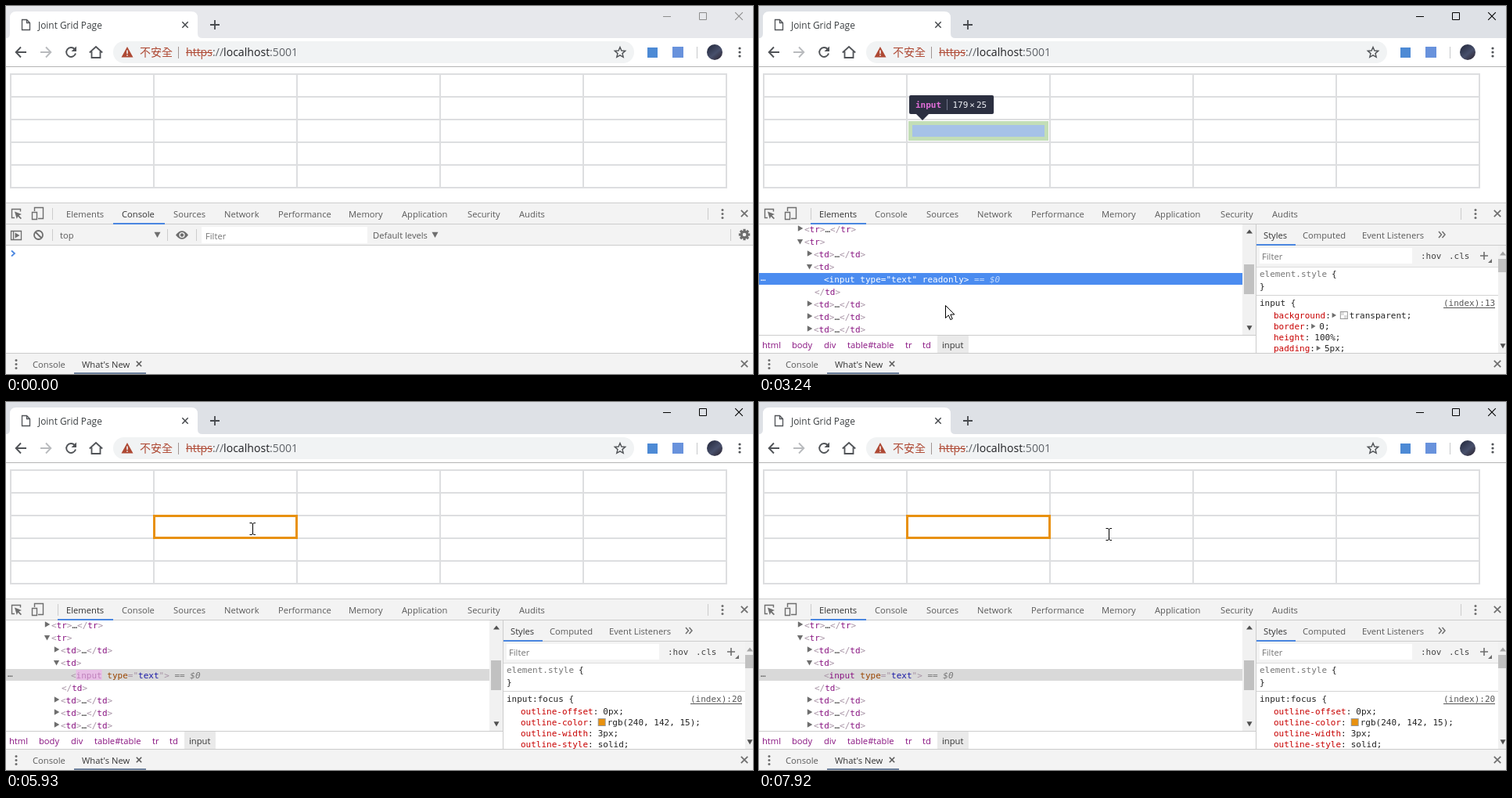
Recreate the animation shown at these times as an HTML page with a canvas. Size 955 by 470 pixels, loop 8000 ms.

```html
<!DOCTYPE html>
<html lang="en">
<head>
<meta charset="utf-8">
<title>Joint Grid Page</title>
<style>
html, body { margin: 0; width: 100%; height: 100%; overflow: hidden; background: #fff; }
canvas { display: block; }
</style>
</head>
<body>
<canvas id="stage" width="955" height="470"></canvas>
<script>
const ctx = document.getElementById('stage').getContext('2d');
const LOOP = 8000;
const UI = '11.2px "Open Sans", "Noto Sans", sans-serif';
const TITLE = '11.9px "Open Sans", "Noto Sans", sans-serif';
const URL_FONT = '14.1px "Open Sans", "Noto Sans", sans-serif';
const CJK = '14px "Noto Sans CJK TC", "Noto Sans CJK", sans-serif';
const MONO = '11px "DejaVu Sans Mono", "Noto Sans Mono", monospace';
const GREY = '#5a5a5a', ICON = '#6e6e6e', BAR = '#f3f3f3', EDGE = '#cccccc', BLUE = '#4a86e0';
const TAG = '#881280', BRACKET = '#a894a6', ATTR = '#994500', VALUE = '#1a1aa6';
const CELL_W = 183, CELL_H = 29, LEFT = 6, TOP = 87;

// --- drawing helpers ---
function box(x, y, w, h, fill) {
  ctx.fillStyle = fill;
  ctx.fillRect(x, y, w, h);
}
function text(s, x, y, color = GREY, font = UI) {
  ctx.font = font;
  ctx.fillStyle = color;
  ctx.fillText(s, x, y);
  return x + ctx.measureText(s).width;
}
function runs(parts, x, y, font = MONO) {
  for (const [s, color] of parts) x = text(s, x, y, color, font);
  return x;
}
function disc(x, y, r, fill) {
  ctx.fillStyle = fill;
  ctx.beginPath();
  ctx.arc(x, y, r, 0, 7);
  ctx.fill();
}
function shape(d, { x = 0, y = 0, fill, stroke, width = 1 }) {
  const p = new Path2D(d);
  ctx.save();
  ctx.translate(x, y);
  if (fill) { ctx.fillStyle = fill; ctx.fill(p, 'evenodd'); }
  if (stroke) { ctx.strokeStyle = stroke; ctx.lineWidth = width; ctx.stroke(p); }
  ctx.restore();
}
function rounded(x, y, w, h, r, fill) {
  ctx.fillStyle = fill;
  ctx.beginPath();
  ctx.roundRect(x, y, w, h, r);
  ctx.fill();
}
function cross(x, y, r, stroke, width) {
  shape(`M${-r} ${-r}L${r} ${r}M${r} ${-r}L${-r} ${r}`, { x, y, stroke, width });
}
function dots(x, y, gap, color, r = 1.5) {
  for (const k of [-1, 0, 1]) disc(x, y + k * gap, r, color);
}
function down(x, y, r, fill = ICON) { shape(`M${-r} ${-r * .8}H${r}L0 ${r}Z`, { x, y, fill }); }
function up(x, y, r, fill = '#505050') { shape(`M${-r} ${r * .6}H${r}L0 ${-r * .6}Z`, { x, y, fill }); }
function right(x, y, r, fill = ICON) { shape(`M${-r * .7} ${-r}V${r}L${r} 0Z`, { x, y, fill }); }
function mix(a, b, k) {
  return `rgb(${a.map((v, i) => Math.round(v + (b[i] - v) * k)).join()})`;
}

// --- pointer ---
const PATH = [
  [780, 521, 439], [1480, 17, 266], [1740, 17, 266], [2210, 247, 160], [2950, 247, 160],
  [3320, 235, 411], [3700, 228, 309], [3760, 228, 311], [3960, 240, 411], [4490, 323, 150],
  [4795, 323, 150], [4850, 315, 161], [5900, 315, 161], [5930, 315, 162], [6190, 228, 410],
  [6430, 213, 306], [6720, 215, 361], [6900, 232, 411], [7180, 230, 366], [7340, 230, 366],
  [7920, 447, 169], [8000, 447, 169]
];
function slope(i, axis) {
  if (i < 1 || i >= PATH.length - 1) return 0;
  const d = j => (PATH[j + 1][axis] - PATH[j][axis]) / (PATH[j + 1][0] - PATH[j][0]);
  const a = d(i - 1), b = d(i);
  return a * b <= 0 ? 0 : 2 * a * b / (a + b);
}
function pointer(t) {
  if (t < PATH[0][0]) return null;
  let i = 0;
  while (i < PATH.length - 2 && t >= PATH[i + 1][0]) i++;
  const span = PATH[i + 1][0] - PATH[i][0], u = (t - PATH[i][0]) / span;
  return [1, 2].map(axis => {
    const a = PATH[i][axis], b = PATH[i + 1][axis];
    return a + (b - a) * u * u * (3 - 2 * u)
      + span * u * (1 - u) * (slope(i, axis) * (1 - u) - slope(i + 1, axis) * u);
  });
}
function cellAt([x, y]) {
  const col = Math.floor((x - LEFT) / CELL_W), row = Math.floor((y - TOP) / CELL_H);
  return col >= 0 && col < 5 && row >= 0 && row < 5 ? { row, col } : null;
}
function drawPointer(t, inspecting) {
  const at = pointer(t);
  if (!at) return;
  const [x, y] = at.map(Math.round);
  const pressed = [[1650, 1740], [2440, 2540], [5080, 5150], [5250, 5320]].some(([a, b]) => t >= a && t < b);
  if (pressed) disc(x, y, 12.5, 'rgba(255,255,0,.5)');
  if (cellAt(at) && !inspecting) {
    shape('M-3.5 -7.5H-1L.5 -6.5L2 -7.5H4M.5 -6.5V6.5M-3.5 7.5H-1L.5 6.5L2 7.5H4', { x, y, stroke: '#000' });
  } else {
    shape('M.5 .5V16.5L4.3 12.9L6.8 18.6L9.3 17.5L6.8 12H11.9Z', { x, y, fill: '#fff', stroke: '#000' });
  }
}

// --- browser frame ---
function drawBrowser(active) {
  box(0, 0, 955, 41, active ? '#dee1e6' : '#e7e8ec');
  shape('M0 41Q5 41 5 35V15Q5 7 13 7H237Q245 7 245 15V35Q245 41 251 41Z', { fill: '#fff' });
  shape('M20.5 17.5H26.5L30.5 21.5V30.5H20.5ZM26.5 17.5V21.5H30.5', { stroke: '#505357', width: 1.3 });
  text('Joint Grid Page', 41, 29, '#3c4043', TITLE);
  cross(229, 24, 3.7, '#46494d', 1.5);
  shape('M261 24H273M267 18V30', { stroke: '#46494d', width: 1.8 });
  const ctl = active ? '#000' : '#8c8c8c';
  shape('M840 13.5H850M886.5 8.5H895.5V17.5H886.5Z', { stroke: ctl });
  cross(937, 13, 4.8, ctl, 1.1);

  box(0, 41, 955, 36, '#fff');
  box(0, 77, 955, 1, '#b4b4b4');
  const dark = '#505357';
  shape('M26 59H13M19 52.5L12.7 59L19 65.5', { stroke: dark, width: 1.9 });
  shape('M44 59H57M51 52.5L57.3 59L51 65.5', { stroke: '#b9bbbe', width: 1.9 });
  shape('M87.7 55A6 6 0 1 0 89 60.5', { stroke: dark, width: 1.9 });
  shape('M90 51.5V58H83.5Z', { fill: dark });
  shape('M106.8 59.5L115 52L123.2 59.5M109.5 58V66H120.5V58', { stroke: dark, width: 1.8 });
  rounded(137, 45, 666, 28, 14, '#f1f3f4');
  const warn = '#ae4934';
  shape('M155 52L162.5 65.5H147.5ZM154.2 56.5V61H155.8V56.5ZM154.2 62.2V63.8H155.8V62.2Z', { fill: warn });
  text('不安全', 171, 64, warn, CJK);
  box(220, 52, 1, 15, '#a09693');
  const end = text('https', 230, 64, warn, URL_FONT);
  box(230, 59, end - 230, 1, warn);
  runs([['://', '#5f6368'], ['localhost', '#202124'], [':5001', '#5f6368']], end, 64, URL_FONT);
  shape('M785 52.5L786.9 57L791.7 57.4L788 60.6L789.2 65.3L785 62.8L780.8 65.3L782 60.6L778.3 57.4L783.1 57Z',
    { stroke: dark, width: 1.4 });
  box(820, 53, 13, 13, '#4d8ad5');
  box(852, 52, 14, 14, '#6892dc');
  box(883, 52, 1, 15, '#c6c8cb');
  const tone = ctx.createLinearGradient(898, 50, 914, 69);
  tone.addColorStop(0, '#252a3e');
  tone.addColorStop(.55, '#48506c');
  tone.addColorStop(1, '#2c2430');
  disc(906, 59, 10, tone);
  dots(938, 59, 5, dark, 1.6);
}
function drawTable() {
  for (let i = 0; i < 6; i++) {
    box(LEFT - 1 + i * CELL_W, TOP - 1, 2, 147, '#dddee0');
    box(LEFT - 1, TOP - 1 + i * CELL_H, 917, 2, '#dddee0');
  }
}

// --- devtools ---
function drawTabs(elements, inspectColor) {
  box(0, 251, 955, 28, BAR);
  box(0, 251, 955, 1, EDGE);
  box(0, 278, 955, 1, EDGE);
  shape('M11 270.5H7.5V259.5H18.5V262.5', { stroke: inspectColor, width: 1.4 });
  shape('M11 262.5L20 266L16.5 267.5L20 271L18.8 272.2L15.2 268.7L13.8 272Z', { fill: inspectColor });
  shape('M36.5 262V257.5H47.5V271.5H41M33.5 263.5H39.5V272.5H33.5Z', { stroke: ICON, width: 1.4 });
  box(elements ? 66 : 59, 258, 1, 15, EDGE);
  const names = ['Elements', 'Console', 'Sources', 'Network', 'Performance', 'Memory', 'Application', 'Security', 'Audits'];
  const xs = [77, 148, 214, 279, 348, 438, 506, 590, 656];
  names.forEach((s, i) => text(s, xs[i], 270, i === (elements ? 0 : 1) ? '#333' : GREY));
  box(elements ? 66 : 137, 277, elements ? 71 : 66, 2, BLUE);
  box(897, 258, 1, 15, EDGE);
  dots(916, 265.5, 5, ICON);
  cross(944, 265, 4.2, ICON, 1.7);
}
function drawDrawer() {
  box(0, 443, 955, 27, BAR);
  box(0, 443, 955, 1, EDGE);
  dots(13, 457.5, 5, ICON);
  text('Console', 34, 462);
  text("What's New", 97, 462, '#333');
  cross(170, 457, 3.2, GREY, 1.6);
  box(87, 468, 92, 2, '#70839f');
  cross(944, 457, 4.2, ICON, 1.7);
}
function drawConsole() {
  box(0, 279, 955, 26, BAR);
  box(0, 305, 955, 1, EDGE);
  shape('M6.5 287.5H19.5V298.5H6.5ZM9.5 287.5V298.5', { stroke: ICON, width: 1.3 });
  right(14, 293, 3.5);
  shape('M47 292.5A5.5 5.5 0 1 1 36 292.5A5.5 5.5 0 1 1 47 292.5M37.5 288.5L45.5 296.5', { stroke: ICON, width: 1.8 });
  for (const x of [59, 206, 243, 926]) box(x, 285, 1, 15, EDGE);
  text('top', 69, 297);
  down(193.5, 292, 4);
  shape('M217 292.5Q225 282 233 292.5Q225 303 217 292.5Z', { fill: ICON });
  disc(225, 292.5, 3.6, BAR);
  disc(225, 292.5, 2.2, ICON);
  box(250, 282, 212, 21, '#fff');
  text('Filter', 255, 298, '#757575');
  text('Default levels', 469, 297);
  down(548.5, 292, 4);
  for (let i = 0; i < 8; i++) {
    ctx.save();
    ctx.translate(944, 292);
    ctx.rotate(i * Math.PI / 4);
    box(-1.6, -7.2, 3.2, 4, ICON);
    ctx.restore();
  }
  disc(944, 292, 5.3, ICON);
  disc(944, 292, 2.3, BAR);
  box(0, 306, 955, 137, '#fff');
  shape('M7 312.5L11 316L7 319.5', { stroke: BLUE, width: 1.7 });
}

const tag = (name, close) => [[close ? '</' : '<', BRACKET], [name, TAG], ['>', BRACKET]];
const folded = name => [...tag(name), ['…', '#333'], ...tag(name, true)];
// kind, outlined table part, for each visible tree line
const TREE = [
  ['tr', { el: 'tr', row: 1 }], ['tr open', { el: 'tr', row: 2 }],
  ['td', { el: 'td', row: 2, col: 0 }], ['td open', { el: 'td', row: 2, col: 1 }],
  ['input', { el: 'input', row: 2, col: 1 }], ['td close', { el: 'td', row: 2, col: 1 }],
  ['td', { el: 'td', row: 2, col: 2 }], ['td', { el: 'td', row: 2, col: 3 }], ['td', { el: 'td', row: 2, col: 4 }]
];
function lineAt(at) {
  if (!at || at[0] > 618 || at[1] < 279 || at[1] >= 420) return -1;
  return Math.floor((at[1] - 277) / 16);
}
function drawInputLine(t, y) {
  const focused = t < 5080, readonly = t < 5330;
  box(0, y - 8, 618, 15, focused ? '#4b8cf0' : '#d9d9d9');
  const c = color => focused ? '#fff' : color;
  text('…', 2, y + 2, c('#5a5a5a'), MONO);
  let x = text('<', 83, y + 4, c(BRACKET), MONO);
  let name = c(TAG);
  const age = t - 5330;
  if (age >= 0 && age < 1400) {
    const k = 1 - (1 - Math.min(1, age / 1120)) ** 3;
    ctx.globalAlpha = Math.min(1, (1400 - age) / 280);
    box(x, y - 7, 33, 13, mix([158, 54, 153], [240, 205, 238], k));
    ctx.globalAlpha = 1;
    name = mix([255, 255, 255], [136, 18, 128], Math.min(1, age / 1120));
  }
  const parts = [['input', name], [' type', c(ATTR)], ['="', c(BRACKET)], ['text', c(VALUE)], ['"', c(BRACKET)]];
  if (readonly) parts.push([' readonly', c(ATTR)]);
  parts.push(['>', c(BRACKET)]);
  x = runs(parts, x, y + 4);
  text(' == $0', x, y + 4, focused ? '#c2d9fb' : '#777', 'italic ' + MONO);
}
function drawTree(t, hover) {
  box(0, 279, 635, 164, '#fff');
  ctx.save();
  ctx.beginPath();
  ctx.rect(0, 279, 618, 141);
  ctx.clip();
  TREE.forEach(([kind], i) => {
    const y = 285 + i * 16, [name, state] = kind.split(' ');
    if (name === 'input') return drawInputLine(t, y);
    if (i === hover) rounded(0, y - 8, 616, 16, [0, 5, 5, 0], '#edf1fb');
    const x = name === 'tr' ? 58 : 70;
    if (state === 'open') down(x - 5.5, y, 3.6);
    else if (!state) right(x - 5.5, y - 1, 3.8);
    runs(state ? tag(name, state === 'close') : folded(name), state === 'close' ? 71 : x, y + 4);
  });
  ctx.restore();

  box(618, 279, 17, 141, '#f1f1f1');
  box(620, 330, 13, 38, '#c1c1c1');
  up(627, 288, 4);
  down(627, 411, 3.5, '#505050');
  box(0, 420, 635, 1, EDGE);
  box(228, 421, 40, 22, '#eaeaea');
  const crumbs = { html: 4, body: 42, div: 83, 'table#table': 113, tr: 187, td: 209, input: 234 };
  for (const s in crumbs) text(s, crumbs[s], 437, s === 'input' ? '#333' : TAG);
}
function drawStyles(focusRule) {
  box(635, 279, 320, 164, '#fff');
  box(636, 279, 319, 54, BAR);
  box(635, 279, 1, 164, EDGE);
  box(636, 305, 319, 1, EDGE);
  box(636, 333, 309, 1, '#dddddd');
  text('Styles', 645, 297, '#333');
  text('Computed', 695, 297);
  text('Event Listeners', 771, 297);
  shape('M869 288L872.5 292L869 296M873.5 288L877 292L873.5 296', { stroke: ICON, width: 1.5 });
  box(636, 304, 50, 2, BLUE);
  box(640, 309, 195, 20, '#fff');
  text('Filter', 643, 324, '#757575');
  text(':hov', 846, 323, '#444', MONO);
  text('.cls', 882, 323, '#444', MONO);
  shape('M922 319H932M927 314V324', { stroke: ICON, width: 1.6 });
  shape('M937 323V328H932Z', { fill: ICON });

  text('element.style', 640, 346, '#777', MONO);
  text('{', 732, 346, '#222', MONO);
  text('}', 640, 362, '#222', MONO);
  box(636, 369, 309, 1, '#d4d4d4');
  text(focusRule ? 'input:focus {' : 'input {', 640, 383, '#222', MONO);
  const link = '(index):' + (focusRule ? 20 : 13);
  text(link, 875, 383, '#555', MONO);
  box(875, 385, 66, 1, '#555');
  const rules = focusRule
    ? [['outline-offset', '0px'], ['outline-color', 'rgb(240, 142, 15)', '#e8910f'], ['outline-width', '3px'], ['outline-style', 'solid']]
    : [['background', 'transparent', '#fff', 1], ['border', '0', 0, 1], ['height', '100%'], ['padding', '5px', 0, 1]];
  rules.forEach(([name, value, swatch, arrow], i) => {
    const y = 399 + i * 14;
    let x = runs([[name, '#c80000'], [':', '#222']], 658, y);
    if (arrow) { right(x + 4, y - 4, 3.2); x += 6; }
    x += 6;
    if (swatch) {
      box(x, y - 9, 10, 10, '#999');
      box(x + 1, y - 8, 8, 8, swatch);
      if (arrow) { box(x + 1, y - 8, 4, 4, '#ddd'); box(x + 5, y - 4, 4, 4, '#ddd'); }
      x += 12;
    }
    text(value + ';', x, y, '#222', MONO);
  });
  box(945, 306, 10, 137, '#f1f1f1');
  box(945, 323, 10, 17, '#c1c1c1');
  up(951, 316, 4, '#a3a3a3');
  down(951, 434, 3.5, '#505050');
}

// --- element outline and its size label ---
function drawOverlay({ el, row, col = 0 }) {
  let x = LEFT + col * CELL_W, y = TOP + row * CELL_H + (el === 'input' ? 2 : 0), w = CELL_W, h = CELL_H;
  const content = 'rgba(128,168,222,.7)', padding = 'rgba(147,196,125,.55)', border = 'rgba(255,229,153,.66)';
  const ring = (m, fill) => {
    shape(`M0 0H${w}V${h}H0ZM${m} ${m}H${w - m}V${h - m}H${m}Z`, { x, y, fill });
    x += m; y += m; w -= 2 * m; h -= 2 * m;
  };
  if (el === 'tr') w = CELL_W * 5;
  if (el === 'input') { x += 2; w -= 4; h -= 4; }
  const size = [w, h], tipX = x + 1, tipY = y - 33;
  if (el === 'td') { ring(1, border); ring(1, padding); }
  if (el === 'input') ring(5, padding);
  box(x, y, w, h, content);

  const ink = '#2b2f40', bold = 'bold ' + MONO, nameW = el.length * 6.62;
  rounded(tipX, tipY, nameW + 75, 24, 2, ink);
  shape('M9 24H25L17 32Z', { x: tipX, y: tipY, fill: ink });
  text(el, tipX + 8, tipY + 16, '#e36eda', bold);
  const sep = Math.round(tipX + nameW + 15);
  box(sep, tipY + 5, 1, 14, '#70748a');
  let tx = text(size[0], sep + 7.5, tipY + 16, '#eef0f5', MONO);
  tx = text('×', tx + 2, tipY + 16, '#eef0f5', MONO);
  text(size[1], tx + 2, tipY + 16, '#eef0f5', MONO);
}

function draw(t) {
  const elements = t >= 2590, inspecting = t >= 1740 && t < 2540;
  const seen = pointer(t - 40);
  const hover = elements ? lineAt(seen) : -1;
  let target = hover >= 0 ? TREE[hover][1] : null;
  if (inspecting && t < 2440) {
    const cell = cellAt(seen);
    if (cell) target = { el: 'input', ...cell };
  }
  box(0, 0, 955, 470, '#fff');
  drawBrowser(t >= 1650);
  drawTable();
  if (t >= 5250 && Math.floor((t - 5250) / 530) % 2 === 0) box(196, 152, 1, 15, '#000');
  if (target) drawOverlay(target);
  if (t >= 5080) {
    ctx.strokeStyle = '#e8910f';
    ctx.lineWidth = 3;
    ctx.strokeRect(189.5, 145.5, 182, 28);
  }
  drawTabs(elements, inspecting ? BLUE : t >= 1450 && t < 1740 ? '#333' : ICON);
  if (elements) {
    drawTree(t, hover);
    drawStyles(t >= 5180);
  } else {
    drawConsole();
  }
  drawDrawer();
  drawPointer(t, inspecting);
}

const start = performance.now();
function tick() {
  draw((performance.now() - start) % LOOP);
  requestAnimationFrame(tick);
}
tick();
</script>
</body>
</html>
```
